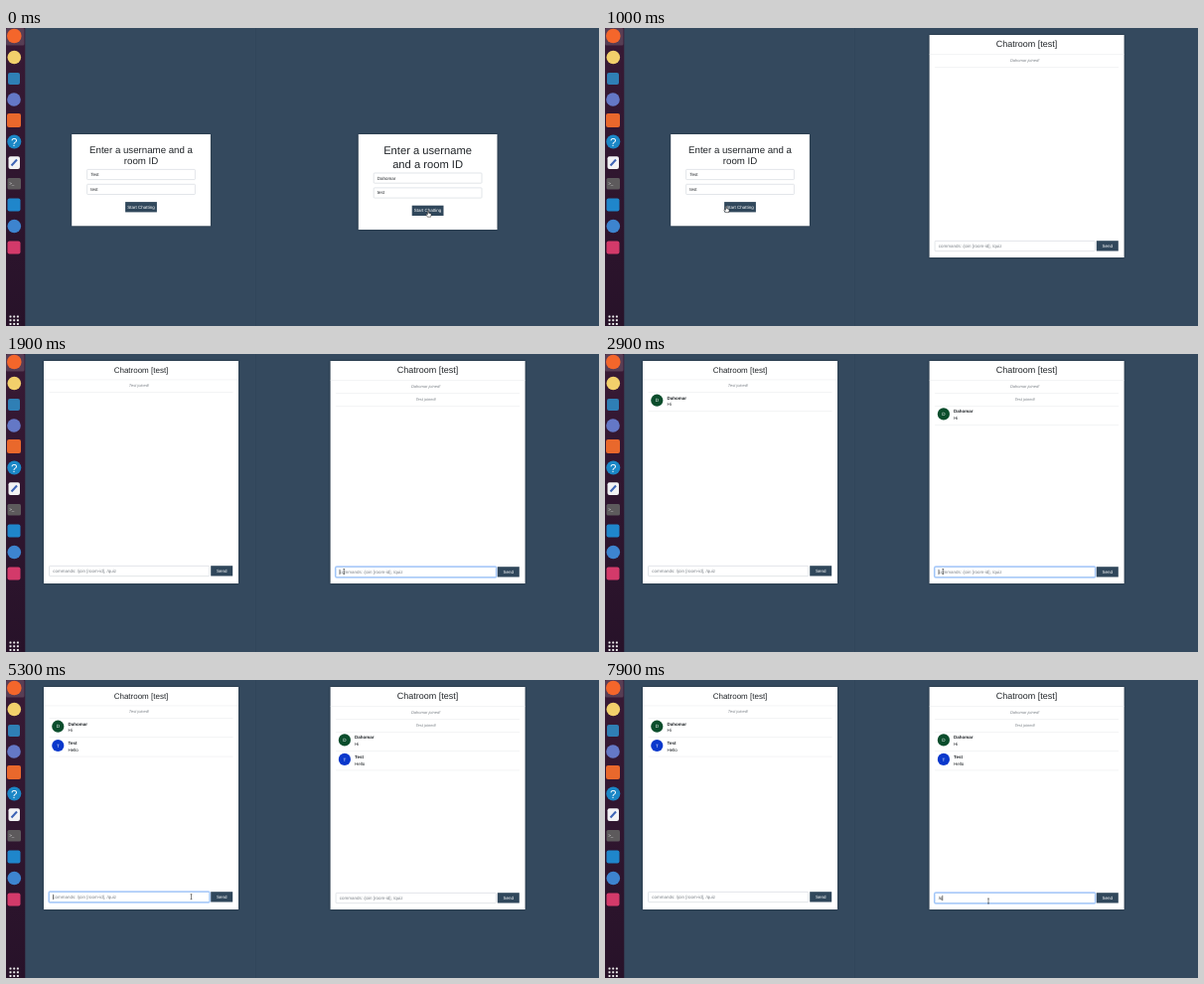
Recreate the animation shown at these times as an HTML page. Size 597x300 px, loop 8000 ms.

```html
<!DOCTYPE html>
<html lang="en">
<head>
<meta charset="utf-8">
<title>Chatroom demo</title>
<style>
  html, body { margin: 0; width: 100%; height: 100%; overflow: hidden; background: #34495e; }
  svg { display: block; width: 100vw; height: 100vh; }
  text { font-family: "Liberation Sans", Arial, sans-serif; text-rendering: geometricPrecision; white-space: pre; }
  .card { filter: drop-shadow(0 .5px .8px rgba(0, 0, 0, .35)); }
</style>
</head>
<body>
<svg id="stage" viewBox="0 0 597 300" preserveAspectRatio="none"></svg>
<script>
const LOOP = 8000, STEP = 100;
const INK = '#212529', GREY = '#7b8187', GREEN = '#0b4d2c', BLUE = '#0a38cc';
const GUEST = 'Dahomar';
const HINT = 'commands: /join [room-id], /quiz';
const stage = document.getElementById('stage');

function el(parent, tag, attrs, content) {
  const node = document.createElementNS('http://www.w3.org/2000/svg', tag);
  for (const key in attrs) node.setAttribute(key, attrs[key]);
  if (content !== undefined) node.textContent = content;
  return parent.appendChild(node);
}
const group = (parent = stage) => el(parent, 'g', {});
const box = (g, x, y, width, height, fill, more) =>
  el(g, 'rect', { x, y, width, height, fill, ...more });
const disc = (g, cx, cy, r, fill) => el(g, 'circle', { cx, cy, r, fill });
const label = (g, x, y, size, fill, content, more) =>
  el(g, 'text', { x, y, 'font-size': size, fill, ...more }, content);
const middle = { 'text-anchor': 'middle' };
const show = (node, on) => node.setAttribute('visibility', on ? 'inherit' : 'hidden');

function dock() {
  const g = group();
  const fade = el(g, 'linearGradient', { id: 'dock', x1: 0, y1: 0, x2: 0, y2: 1 });
  el(fade, 'stop', { offset: 0, 'stop-color': '#381a35' });
  el(fade, 'stop', { offset: 1, 'stop-color': '#271229' });
  box(g, 0, 0, 19.3, 300, 'url(#dock)');
  box(g, 0, 0, 18.5, 17.5, '#fff', { opacity: .16, rx: 1.5 });
  const square = (y, fill, size = 13) => box(g, 8 - size / 2, y - size / 2, size, size, fill, { rx: 2 });
  disc(g, 8.3, 8, 7.3, '#f4662b');
  disc(g, 8.3, 29.5, 6.8, '#f2d06b');
  square(51, '#2f7fb5', 12);
  disc(g, 8, 72, 6.8, '#6478c6');
  square(93, '#e9682c', 14);
  disc(g, 8.3, 114.5, 7, '#1b87c6');
  label(g, 8.3, 118.6, 11.5, '#fff', '?', middle);
  box(g, 2.5, 129.3, 11.5, 12.6, '#f2f2f4', { rx: 2 });
  el(g, 'path', { d: 'M5.5 138.5L11 132.5', stroke: '#3d63b5', 'stroke-width': 2 });
  box(g, 1.5, 151, 13.5, 11.5, '#5d5a5c', { rx: 1.5 });
  label(g, 3.2, 157.6, 4.5, '#eee', '>_');
  square(178, '#1f86cb');
  disc(g, 8.3, 199.5, 6.8, '#3d84cf');
  square(221, '#d33a6a');
  for (let i = 0; i < 9; i++)
    box(g, 3.5 + (i % 3) * 3.7, 289.5 + Math.floor(i / 3) * 3.7, 2, 2, '#eee', { rx: .4 });
}

const card = (g, x, y, w, h) => box(g, x, y, w, h, '#fff', { class: 'card' });

function button(g, x, y, w, content) {
  box(g, x, y, w, 10.3, '#30475b');
  label(g, x + w / 2, y + 6.6, 4.5, '#fff', content, middle);
}

const field = (g, x, y, w, stroke = '#ced4da') =>
  box(g, x, y, w, 10.2, '#fff', { stroke, 'stroke-width': .6, rx: .8 });

function joinForm({ x, h, size, lines, base, top, user }) {
  const g = group();
  card(g, x, 107, 139.7, h);
  lines.forEach((line, i) =>
    label(g, x + 69.8, base + i * size * 1.2, size, INK, line, middle));
  [user, 'test'].forEach((value, i) => {
    const y = top + i * 14.9;
    field(g, x + 15.4, y, 108.8);
    label(g, x + 19, y + 6.5, 4.5, INK, value);
  });
  button(g, x + 53.9, top + 32.7, 31.8, 'Start Chatting');
  return g;
}

// dy is the extra height of the window's larger title row.
function chatRoom({ x, dy, size }) {
  const g = group();
  card(g, x, 7, 196, 224);
  label(g, x + 98, 19, size, INK, 'Chatroom [test]', middle);
  const rule = (parent, y, inset = 5.5) => box(parent, x + inset, y, 196 - inset * 2, .5, '#e6e8ea');
  rule(g, 25.7 + dy * .6, 0);

  const notice = (y, who) => {
    const n = group(g);
    label(n, x + 96, y, 4, GREY, who + ' joined!', { ...middle, 'font-style': 'italic' });
    rule(n, y + 5.4);
    return n;
  };
  const message = (y, who, words, colour) => {
    const m = group(g);
    disc(m, x + 14.3, y, 6.1, colour);
    label(m, x + 14.3, y + 1.6, 4.6, '#fff', who[0], middle);
    label(m, x + 24.5, y - 1, 4.5, INK, who, { 'font-weight': 'bold' });
    label(m, x + 24.5, y + 5.7, 4.5, INK, words);
    rule(m, y + 10.8);
    return m;
  };

  const top = 213.4 + dy;
  field(g, x + 5.5, top, 161.2);
  const ring = group(g);
  box(ring, x + 4.9, top - .6, 162.4, 11.4, 'none',
    { stroke: '#0d6efd', 'stroke-opacity': .3, 'stroke-width': 1.2, rx: 1.4 });
  field(ring, x + 5.5, top, 161.2, '#80b2f5');
  const hint = label(g, x + 9.2, top + 6.4, 4.5, GREY, HINT);
  const typed = label(g, x + 9.2, top + 6.4, 4.5, INK, '');
  const caret = box(g, 0, top + 2.4, .6, 5.3, '#222');
  button(g, x + 168.2, top - .2, 22, 'Send');

  function update(text, focus, caretOn) {
    ring.setAttribute('opacity', focus);
    show(hint, !text);
    typed.textContent = text;
    caret.setAttribute('x', x + 9.1 + (text ? typed.getComputedTextLength() + .1 : 0));
    show(caret, caretOn);
  }
  return { g, notice, message, update };
}

dock();
box(stage, 251.2, 0, .8, 300, '#2d4257', { opacity: .6 });

const leftForm = joinForm({
  x: 66.2, h: 92.3, size: 9.7, base: 125.7, top: 142.4, user: 'Test',
  lines: ['Enter a username and a', 'room ID']
});
const rightForm = joinForm({
  x: 354.8, h: 96, size: 11.2, base: 127.4, top: 146, user: GUEST,
  lines: ['Enter a username', 'and a room ID']
});

const left = chatRoom({ x: 38, dy: 0, size: 8 });
const right = chatRoom({ x: 326.6, dy: 1, size: 9 });
left.notice(33, 'Test');
right.notice(34, GUEST);
const joined = right.notice(46.6, 'Test');
const hi = [left.message(46.7, GUEST, 'Hi', GREEN), right.message(60.4, GUEST, 'Hi', GREEN)];
const hello = [left.message(66, 'Test', 'Hello', BLUE), right.message(79.9, 'Test', 'Hello', BLUE)];

const pointer = group();
const outline = { 'stroke-width': .5, 'stroke-linejoin': 'round' };
const shapes = {
  hand: el(pointer, 'path', {
    ...outline, fill: '#fff', stroke: '#111',
    d: 'M-.6 0Q0-.7 .6 0V2.3L2.7 2.9Q3.3 3.2 3.1 4L2.6 6.2H-.6L-2.2 3.7Q-2 2.8-.6 3.8Z'
  }),
  arrow: el(pointer, 'path', {
    ...outline, fill: '#111', stroke: '#fff',
    d: 'M0 0V5.6L1.3 4.4L2.2 6.3L3 5.9L2.1 4.1H3.8Z'
  }),
  beam: el(pointer, 'path', {
    fill: 'none', stroke: '#222', 'stroke-width': .55,
    d: 'M-.9-2.5H.9M0-2.5V2.5M-.9 2.5H.9'
  })
};

// time, x, y, shape
const path = [
  [0, 425, 184, 'hand'], [100, 425, 184, 'arrow'], [200, 420, 184, 'arrow'],
  [500, 265, 187, 'arrow'], [700, 130, 182, 'hand'], [800, 111, 180, 'arrow'],
  [900, 118, 179.5, 'arrow'], [1000, 122, 179.5, 'hand'], [1200, 122, 179.5, 'arrow'],
  [1500, 270, 209, 'arrow'], [1700, 340.3, 219, 'beam'], [3200, 340.3, 219, 'beam'],
  [3300, 315, 218, 'arrow'], [3500, 205, 218, 'beam'], [3600, 186.5, 218.2, 'beam'],
  [5500, 186.5, 218.2, 'beam'], [5600, 215, 222, 'arrow'], [5800, 364, 240, 'arrow'],
  [5900, 364, 240, 'arrow'], [6100, 381, 230, 'arrow'], [6200, 385, 223.5, 'beam'],
  [6300, 386, 222.5, 'beam'], [LOOP, 386, 222.5, 'beam']
];

function movePointer(t) {
  let i = 0;
  while (i < path.length - 2 && path[i + 1][0] <= t) i++;
  const [t0, x0, y0, kind] = path[i], [t1, x1, y1] = path[i + 1];
  const k = (t - t0) / (t1 - t0);
  pointer.setAttribute('transform', `translate(${x0 + (x1 - x0) * k} ${y0 + (y1 - y0) * k})`);
  for (const name in shapes) show(shapes[name], name === kind);
}

const within = (t, a, b) => t >= a && t < b;
// Focus rings fade over 150 ms.
const fadeIn = (t, start) => Math.min(1, Math.max(0, (t - start) / 150));
// The last entry whose time has come, from [time, text] pairs.
const textAt = (t, keys) => keys.reduce((now, [at, text]) => (t >= at ? text : now), '');

const leftKeys = [[4300, 'H'], [4500, 'He'], [4700, 'Hel'], [4800, 'Hell'], [5000, 'Hello'], [5200, '']];
const rightKeys = [[2400, 'H'], [2600, 'Hi'], [2900, ''], [7300, '/'], [7900, '/q']];

function render(t) {
  show(rightForm, t < 100);
  show(right.g, t >= 100);
  show(leftForm, t < 1200);
  show(left.g, t >= 1200);
  show(joined, t >= 1200);
  hi.forEach(m => show(m, t >= 2900));
  hello.forEach(m => show(m, t >= 5200));

  const leftFocus = fadeIn(t, 3750) * (t >= 3900) - fadeIn(t, 6500);
  const rightFocus = fadeIn(t, 1750) - fadeIn(t, 3750) + fadeIn(t, 6500);
  left.update(textAt(t, leftKeys), leftFocus, within(t, 3800, 6000));
  right.update(textAt(t, rightKeys), rightFocus,
    within(t, 1800, 3400) || within(t, 6500, 7700) || t >= 7900);
  movePointer(t);
}

function frame() {
  const t = performance.now() % LOOP;
  render(Math.floor(t / STEP) * STEP);
  requestAnimationFrame(frame);
}
frame();
</script>
</body>
</html>
```
